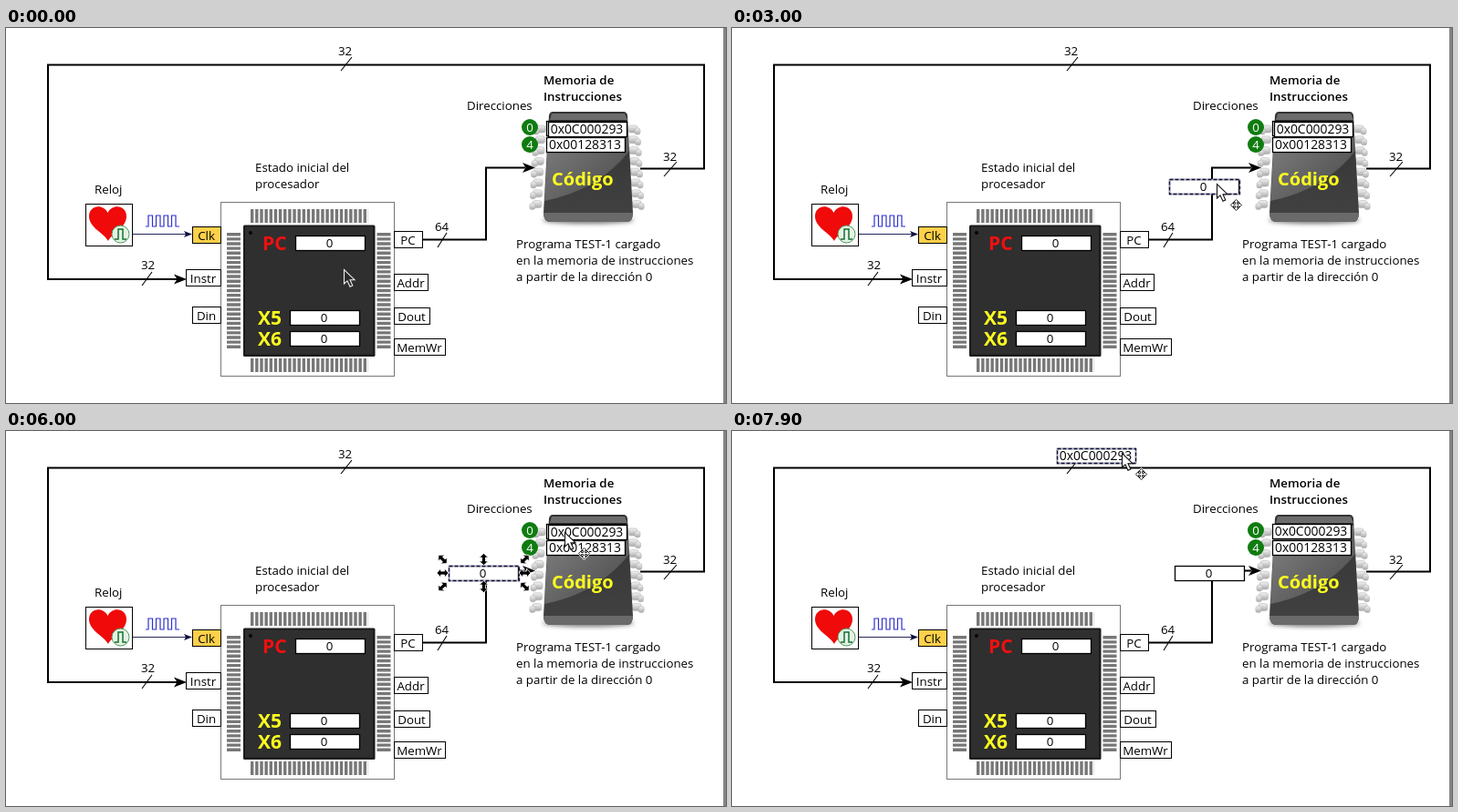
An HTML page that plays this animation: 789x412 px, repeating every 8000 ms.

```html
<!DOCTYPE html>
<html lang="es">
<head>
<meta charset="utf-8">
<title>Ciclo de instrucción</title>
<style>
html, body { margin: 0; width: 100%; height: 100%; overflow: hidden; background: #fff; }
svg { display: block; width: 789px; height: 412px; }
text { font: 500 13.3px "Open Sans", "Noto Sans", sans-serif; fill: #000; }
.mid { text-anchor: middle; }
.semi { font-weight: 600; font-size: 13.3px; }
.hex { font-size: 13.9px; }
.big { font-weight: 700; font-size: 21px; }
.wire { fill: none; stroke: #000; stroke-width: 2; }
.thin { fill: none; stroke: #000; stroke-width: 1.1; }
.box { fill: #fff; stroke: #000; stroke-width: 1.3; }
.pins { stroke: #777; stroke-width: 15; stroke-dasharray: 3.4 1.75; }
</style>
</head>
<body>
<svg viewBox="0 0 789 412">
  <defs>
    <linearGradient id="body" x1="0" y1="0" x2="0" y2="1">
      <stop offset="0" stop-color="#333"/>
      <stop offset="1" stop-color="#424242"/>
    </linearGradient>
    <linearGradient id="shine" x1="0" y1="0" x2=".8" y2="1">
      <stop offset="0" stop-color="#fff" stop-opacity=".4"/>
      <stop offset="1" stop-color="#fff" stop-opacity=".08"/>
    </linearGradient>
    <linearGradient id="pin" x1="0" y1="0" x2="0" y2="1">
      <stop offset="0" stop-color="#f4f4f4"/>
      <stop offset="1" stop-color="#a8a8a8"/>
    </linearGradient>
    <filter id="soft" x="-20%" y="-60%" width="140%" height="220%"><feGaussianBlur stdDeviation="2.5"/></filter>
  </defs>
  <rect width="789" height="412" fill="#fff"/>
  <rect x="786" width="3" height="412" fill="#858585"/>
  <g id="scene"></g>
  <g id="live"></g>
</svg>
<script>
const NS = "http://www.w3.org/2000/svg";
const scene = document.getElementById("scene");
const live = document.getElementById("live");

function add(parent, tag, attrs, label) {
  const el = document.createElementNS(NS, tag);
  for (const k in attrs) el.setAttribute(k, attrs[k]);
  if (label !== undefined) el.textContent = label;
  return parent.appendChild(el);
}
const draw = (tag, attrs) => add(scene, tag, attrs);
const path = (d, cls, attrs = {}) => draw("path", { d, class: cls, ...attrs });
const text = (x, y, label, cls = "", fill = "#000") =>
  add(scene, "text", { x, y, class: cls, style: `fill:${fill}` }, label);
const lines = (x, y, labels, cls) => labels.forEach((s, i) => text(x, y + i * 18, s, cls));

// A white field with centred text, whose corner is its local origin
function field(parent, x, y, w, label, cls = "") {
  const g = add(parent, "g", { transform: `translate(${x} ${y})` });
  add(g, "rect", { x: .5, y: .5, width: w, height: 16, class: "box" });
  add(g, "text", { x: w / 2 - .5, y: 13, class: "mid " + cls }, label);
  return g;
}
function port(x, y, w, label, fill = "#fff") {
  draw("rect", { x: x + .5, y: y + .5, width: w, height: 18, fill, stroke: "#000" });
  text(x + w / 2, y + 14.5, label, "mid");
}

function drawWires() {
  path("M695 154.500H765V40.500H46V276H188", "wire");
  path("M198 276L184 270.500L187.500 276L184 281.500Z");
  path("M457 232.500H526V153.500H569", "wire");
  path("M580 153.500L566 148L569.500 153.500L566 159Z");
  path("M367 47L379 32M149 283L160 268M473 241L483 225M721 163L735 147", "thin");
  text(364, 30, "32");
  text(148, 265, "32");
  text(470, 223, "64");
  text(720, 146, "32");
}

function drawClock() {
  text(97, 182, "Reloj");
  draw("rect", { x: 87.5, y: 193.5, width: 51, height: 46, fill: "#fff", stroke: "#000" });
  path("M112 234C108 226 91 219 91 207C91 194 107 193 111.500 203C116 193 132 194 132 207C132 219 116 226 112 234Z",
    "", { fill: "#f00a0a" });
  draw("circle", { cx: 125.5, cy: 226.5, r: 9.5, fill: "#e4f2e4", stroke: "#4c9a5c" });
  path("M119 232H123V221H128V232H132", "", { fill: "none", stroke: "#157030", "stroke-width": 1.5 });
  path("M153 218h3" + "v-12h4.500v12h4".repeat(4), "", { fill: "none", stroke: "#3030d0", "stroke-width": 1.2 });
  path("M139 226.500H198", "", { stroke: "#26265c" });
  path("M204 226.500L195 223L197 226.500L195 230Z", "", { fill: "#101040" });
}

function drawProcessor() {
  lines(273, 158, ["Estado inicial del", "procesador"]);
  draw("rect", { x: 235.5, y: 191.5, width: 190, height: 191, fill: "#fff", stroke: "#777" });
  path("M268 206.500H397M268 370.500H397M249.500 225V353M414 225V353", "pins");
  draw("rect", { x: 260, y: 216.5, width: 144.5, height: 144.5, rx: 1.5, fill: "#1c1c1c" });
  draw("rect", { x: 262, y: 218.5, width: 140, height: 140, fill: "#2f2f2f" });
  draw("circle", { cx: 268, cy: 225, r: 2, fill: "#050505" });
  text(281, 244, "PC", "big", "#f01010");
  text(276, 326, "X5", "big", "#ffff20");
  text(276, 349, "X6", "big", "#ffff20");
  field(scene, 317, 228, 76, "0");
  field(scene, 311, 310, 76, "0");
  field(scene, 311, 333, 76, "0");
  port(204, 218, 31, "Clk", "#ffd04a");
  port(197, 265, 38, "Instr");
  port(204, 306, 31, "Din");
  port(425, 223, 31, "PC");
  port(425, 270, 37, "Addr");
  port(425, 307, 39, "Dout");
  port(425, 341, 56, "MemWr");
}

function drawLeg(x, y, w, h) {
  draw("rect", { x: x - w / 2, y, width: w, height: h, rx: 2.5, fill: "url(#pin)", stroke: "#b4b4b4", "stroke-width": .6 });
}

function drawMemory() {
  lines(589, 62, ["Memoria de", "Instrucciones"], "semi");
  text(505, 90, "Direcciones");
  draw("ellipse", { cx: 638, cy: 211, rx: 50, ry: 4, fill: "#777", filter: "url(#soft)" });
  for (let i = 0; i < 8; i++) {
    for (const side of [-1, 1]) {
      const x = 636.5 + side * (50.5 + i * .6), y = 107 + i * 11.8;
      drawLeg(x, y, 10, 8);
      drawLeg(x + side * 5, y + 3, 6, 7);
    }
  }
  path("M599 92H677Q680 92 681 96L687 203Q687 213 680 213H597Q589 213 589 203L595 96Q596 92 599 92Z",
    "", { fill: "url(#body)" });
  path("M596 101L598 94H678L681 101Z", "", { fill: "#6c6c6c" });
  path("M595 104H682L684 134Q650 178 590 190Z", "", { fill: "url(#shine)" });
  path("M589 203H687Q687 213 680 213H597Q589 213 589 203Z", "", { fill: "#6a6a6a" });
  text(598, 173, "Código", "big", "#ffff20").style.fontSize = "20px";
  field(scene, 592, 102, 86, "0x0C000293", "hex");
  field(scene, 592, 120, 86, "0x00128313", "hex");
  for (const i of [0, 1]) {
    draw("circle", { cx: 574, cy: 109 + 19 * i, r: 9, fill: "#107c10" });
    text(574, 114 + 19 * i, 4 * i, "mid", "#fff");
  }
  lines(559, 242, ["Programa TEST-1 cargado", "en la memoria de instrucciones", "a partir de la dirección 0"]);
}

drawWires();
drawClock();
drawProcessor();
drawMemory();

// Moving parts
function dashes(g, w) {
  const frame = { x: .5, y: .5, width: w, height: 16, fill: "none", "stroke-width": 1.3 };
  const d = add(g, "g", {});
  add(d, "rect", { ...frame, stroke: "#b8b8cc" });
  add(d, "rect", { ...frame, stroke: "#0c0c38", "stroke-dasharray": "4 2" });
  return d;
}
const value = field(live, 0, 0, 76, "0");
const valueDash = dashes(value, 77);
const code = field(live, 0, 0, 86, "0x0C000293", "hex");
const codeDash = dashes(code, 86);

// Scaling arrows around the selected field
const ARROWS = "M-6.500 0L-2 -5V-2H2V-5L6.500 0L2 5V2H-2V5Z";
const handles = add(live, "g", { fill: "#000", stroke: "#fff", "stroke-width": .8 });
for (const i of [-1, 0, 1]) {
  for (const j of [-1, 0, 1]) {
    if (!i && !j) continue;
    const turn = i && j ? 45 * i * j : 90 * j;
    add(handles, "path", { d: ARROWS, transform: `translate(${523.5 + 45 * i} ${156 + 15 * j}) rotate(${turn})` });
  }
}

const cursor = add(live, "g", {});
const arrow = add(cursor, "path", { d: "M.5 .5V16L4 12.800L7 19.300L9.800 18L7 11.700H12Z", "stroke-width": 1.1 });
const mover = add(cursor, "g", { transform: "translate(21.500 23.500)" });
const CROSS = "M0 -6L3 -3H1V-1H3V-3L6 0L3 3V1H1V3H3L0 6L-3 3H-1V1H-3V3L-6 0L-3 -3V-1H-1V-3H-3Z";
add(mover, "path", { d: CROSS, fill: "#fff", stroke: "#fff", "stroke-width": 2 });
add(mover, "path", { d: CROSS, fill: "#fff", stroke: "#111", "stroke-width": .9 });

// Each move: start, end, x, y reached, ease-out power
const tipStart = [370, 265];
const tipMoves = [
  [800, 1100, 375, 252],
  [1200, 1500, 365, 236],
  [1800, 1900, 374, 234],
  [1900, 2700, 514, 226],
  [2700, 3600, 537, 153, 3.5],
  [4300, 4700, 594, 135],
  [4700, 4900, 610, 120],
  [5000, 5100, 618, 104],
  [5200, 5400, 612, 111],
  [6200, 6700, 750, 147],
  [6700, 7100, 752, 69],
  [7100, 7900, 427, 24]
];
const codeStart = [594, 103];
const codeMoves = [
  [6200, 6700, 728, 142],
  [6700, 7100, 728, 64],
  [7100, 7900, 356, 19]
];

function follow([x, y], moves, t) {
  for (const [from, to, toX, toY, power = 1] of moves) {
    if (t <= from) break;
    const p = 1 - (1 - Math.min(1, (t - from) / (to - from))) ** power;
    x += (toX - x) * p;
    y += (toY - y) * p;
  }
  return [x, y];
}
const place = (el, [x, y]) => el.setAttribute("transform", `translate(${Math.round(x)} ${Math.round(y)})`);
const show = (el, on) => el.setAttribute("visibility", on ? "visible" : "hidden");

function valueAt(t, [x, y]) {
  if (t < 2000) return [318, 228];
  return t <= 3600 ? [x - 52, y - 5] : [485, 148];
}

function render(ms) {
  const t = Math.floor(ms / 100) * 100;
  const tip = follow(tipStart, tipMoves, t);
  const plain = t < 1000;
  place(cursor, tip);
  place(value, valueAt(t, tip));
  place(code, follow(codeStart, codeMoves, t));
  show(value, t >= 1900);
  show(valueDash, t >= 1900 && t < 6300);
  show(codeDash, t >= 6300);
  show(handles, t >= 4400 && t < 6300);
  show(mover, !plain);
  arrow.setAttribute("fill", plain ? "#2a2a2a" : "#fff");
  arrow.setAttribute("stroke", plain ? "#eee" : "#111");
}

const start = performance.now();
function tick() {
  render((performance.now() - start) % 8000);
  requestAnimationFrame(tick);
}
render(0);
requestAnimationFrame(tick);
</script>
</body>
</html>
```
